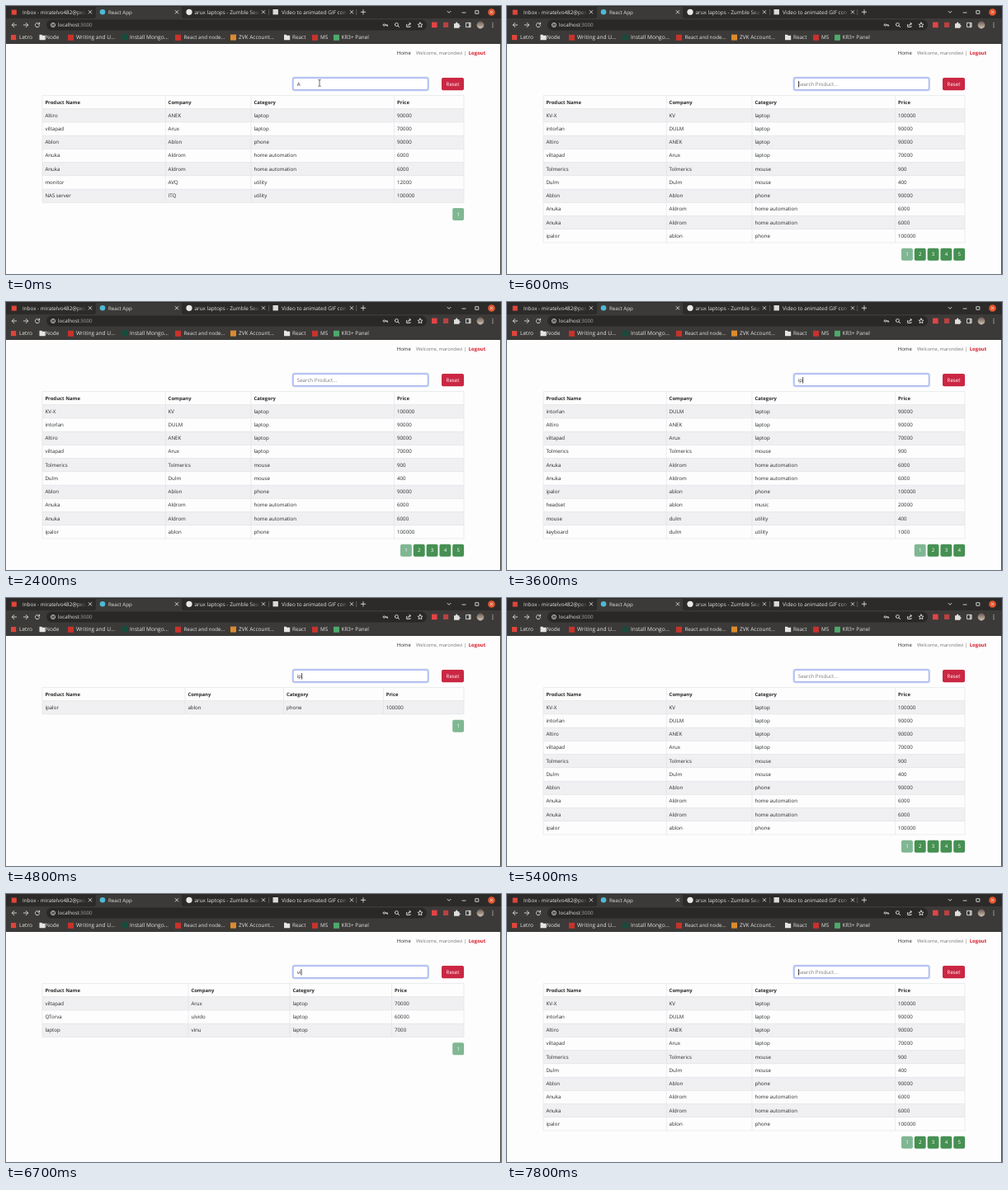
These frames come from a looping animation (600x325 px, 8000 ms). An HTML page:

```html
<!DOCTYPE html>
<html lang="en">
<head>
<meta charset="utf-8">
<title>Product search</title>
<style>
html, body { margin: 0; width: 100%; height: 100%; overflow: hidden; background: #fdfdfd; }
svg { display: block; width: 600px; height: 325px; }
text { font: 6.15px "Open Sans", "Noto Sans", sans-serif; fill: #26292c; text-rendering: geometricPrecision; white-space: pre; }
.b { font-weight: 700; font-size: 5.95px; }
.bar text { fill: #e4e3e1; }
.icon { fill: none; stroke: #dddcda; stroke-width: .9; stroke-linecap: round; stroke-linejoin: round; }
.mid { text-anchor: middle; fill: #fff; }
</style>
</head>
<body>
<svg viewBox="0 0 600 325">
  <defs>
    <linearGradient id="fade"><stop offset="0" stop-color="#2c2b2a" stop-opacity="0"/><stop offset="1" stop-color="#2c2b2a"/></linearGradient>
    <linearGradient id="face" x2="0" y2="1"><stop offset="0" stop-color="#6c5a50"/><stop offset="1" stop-color="#cfc3b4"/></linearGradient>
  </defs>
  <rect width="600" height="325" fill="#fdfdfd"/>
  <g id="bar" class="bar"></g>
  <g id="nav"></g>
  <g id="list"></g>
  <g id="search">
    <rect x="346.6" y="85.8" width="166.3" height="17.4" rx="3.2" fill="#c3cdf8"/>
    <rect x="348.2" y="87.4" width="163.1" height="14.2" rx="1.9" fill="#fff" stroke="#8da0e6" stroke-width=".7"/>
    <text id="hint" x="352.8" y="96.6" style="fill:#74787c">Search Product...</text>
    <text id="query" x="352.8" y="96.6"></text>
    <rect id="caret" y="91" width=".8" height="7.6" fill="#222"/>
    <rect x="528" y="87" width="27" height="15.2" rx="2" fill="#cb2744"/>
    <text class="mid" x="541.5" y="96.6">Reset</text>
    <path id="beam" d="M378.3 89.2q1.7 0 1.7 1q0-1 1.7-1M380 90v6.6M378.3 97.4q1.7 0 1.7-1q0 1 1.7 1" fill="none" stroke="#333" stroke-width=".7"/>
  </g>
  <rect x="599" y="46" width="1" height="279" fill="#4a4948"/>
</svg>
<script>
const $ = id => document.getElementById(id);
const rect = (x, y, w, h, fill, rx = 0) => `<rect x="${x}" y="${y}" width="${w}" height="${h}" fill="${fill}" rx="${rx}"/>`;
const disc = (x, y, r, fill) => `<circle cx="${x}" cy="${y}" r="${r}" fill="${fill}"/>`;
const text = (x, y, s, style = '', cls = '') => `<text x="${x}" y="${y}" class="${cls}" style="${style}">${s}</text>`;
const icon = (x, y, d) => `<path class="icon" transform="translate(${x} ${y})" d="${d}"/>`;
const ring = r => `M${-r} 0a${r} ${r} 0 1 0 ${2 * r} 0a${r} ${r} 0 1 0 ${-2 * r} 0`;
const cross = 'M-1.8-1.8L1.8 1.8M1.8-1.8L-1.8 1.8';

function browserBar() {
  const tabs = [
    [20, 'Inbox - miratelvo482@pos', 6.3, 102],
    [124, 'React App', 6.1, 207],
    [228.5, 'arux laptops - Zumble Sear', 6.4, 312],
    [334, 'Video to animated GIF con', 6.4, 419]
  ];
  const marks = [
    [16, 'Letro', 6.6], [48, 'Node', 6.5], [85, 'Writing and U…', 6.6], [150, 'Install Mongo…', 6.6],
    [215.5, 'React and node…', 6.2], [282, 'ZVK Account…', 6.5], [347, 'React', 6.4], [381, 'MS', 6.4], [406.5, 'KR3+ Panel', 6.4]
  ];
  const folder = x => `<path d="M${x} 34.8h2.6l1 1h3.6v5.4h-7.2z" fill="#e6e5e3"/>`;
  const square = (x, y, fill, w = 7) => rect(x, y, w, w, fill);
  let s = rect(0, 0, 600, 46, '#2c2b2a') + rect(0, 15, 600, 31, '#3b3a39')
    + '<path d="M107 15q2 0 2-2V3q0-2 2-2h100q2 0 2 2v10q0 2 2 2z" fill="#3b3a39"/>';
  for (const [x, label, size, close] of tabs) {
    s += text(x, 9.6, label, `font-size:${size}px`);
    if (label !== 'React App') s += rect(close - 16, 1, 12, 13, 'url(#fade)') + rect(close - 4.5, 1, 20, 13, '#2c2b2a', 0);
    if (label === 'React App') continue;
  }
  // The active tab overlaps the cover of its neighbour.
  s += '<path d="M107 15q2 0 2-2V3q0-2 2-2h100q2 0 2 2v10q0 2 2 2z" fill="#3b3a39"/>' + text(124, 9.6, 'React App');
  for (const t of tabs) s += icon(t[3], 7.3, cross);
  s += rect(318.5, 4, .6, 7, '#777') + rect(424.5, 4, .6, 7, '#777');
  s += square(6.8, 4.6, '#e0453a', 6) + disc(117, 7.3, 3.3, '#4fb8d4') + disc(222, 7.3, 3.6, '#e8e8e8') + square(323.5, 4, '#dcdad7', 6.4);
  s += icon(433, 7.3, 'M-2.7 0h5.4M0-2.7v5.4') + icon(537, 7.3, 'M-2-1L0 1L2-1')
    + icon(555, 8, 'M-2 0h4') + icon(571, 7.5, 'M-1.8-1.8h3.6v3.6h-3.6z')
    + disc(588.5, 7.5, 4.3, '#e4572e') + icon(588.5, 7.5, 'M-1.3-1.3L1.3 1.3M1.3-1.3L-1.3 1.3');

  s += rect(49, 16.6, 461, 12.8, '#292827', 6.4)
    + icon(10, 23, 'M2.7 0h-5.4M-.2-2.6L-2.7 0L-.2 2.6') + icon(24, 23, 'M-2.7 0h5.4M.2-2.6L2.7 0L.2 2.6')
    + icon(38, 23, 'M2.3-1.2A2.6 2.6 0 1 0 2.6.6M2.6-2.8v1.8H.8')
    + icon(57, 23, ring(2.5) + 'M0 0v1.2M0-1.3v.1') 
    + `<text x="63" y="25.2">localhost<tspan style="fill:#aaa8a5">:3000</tspan></text>`
    + icon(460, 23, 'M-2.8 0a1.2 1.2 0 1 0 2.4 0a1.2 1.2 0 1 0-2.4 0M-.4 0h3v1.2M1.4 0v1')
    + icon(474, 23, 'M-2.6-.5a2 2 0 1 0 4 0a2 2 0 1 0-4 0M1 1L2.7 2.7')
    + icon(488, 23, 'M-2.4-.6v3h4.4v-1M-1 1q0-2.6 3.4-2.6M1-2.8L2.6-1.4L1 0')
    + icon(502, 23, 'M0-3L.9-1 3-.8 1.4.6 1.9 2.7 0 1.6-1.9 2.7-1.4.6-3-.8-.9-1z')
    + square(516, 19.6, '#e04444', 6.6) + square(530, 19.8, '#b8423e', 6.2)
    + `<path d="M543 21.2h2q0-1.8 1.2-1.8t1.2 1.8h2v2q1.3 0 1.3 1t-1.3 1v1.6h-6.4z" fill="#e0dfdd"/>`
    + icon(560.5, 23, 'M-2.6-2.6h5.2v5.2h-5.2zM.8-2.4v4.8M1.7-2.4v4.8')
    + disc(575, 23, 4.4, 'url(#face)');
  for (const y of [20.6, 23, 25.4]) s += disc(590, y, .65, '#e0dfdd');

  s += square(6, 35, '#e0453a', 6.2) + folder(40.5) + square(75, 34.8, '#c8322c') + square(140, 34.4, '#174b3c')
    + square(205, 34.8, '#c8322c') + square(272, 34.6, '#dd8b2c') + folder(337) + square(371, 34.8, '#c8322c') + square(397, 34.8, '#4fa86c');
  for (const [x, label, size] of marks) s += text(x, 40.2, label, `font-size:${size}px`);
  return s;
}

const heads = ['Product Name', 'Company', 'Category', 'Price'];
const stock = `KV-X,KV,laptop,100000
intorlan,DULM,laptop,90000
Altiro,ANEK,laptop,90000
viltapad,Arux,laptop,70000
Tolmerics,Tolmerics,mouse,900
Dulm,Dulm,mouse,400
Ablon,Ablon,phone,90000
Anuka,Aldrom,home automation,6000
Anuka,Aldrom,home automation,6000
ipalor,ablon,phone,100000
headset,ablon,music,20000
mouse,dulm,utility,400
keyboard,dulm,utility,1000
monitor,AVQ,utility,12000
TQR,DULM,laptop,100000
hard disk,ZD,utility,6000
NAS server,ITQ,utility,100000
QTorva,ulvido,laptop,60000
laptop,vinu,laptop,7000`.split('\n').map(line => line.split(','));
const pages = { '': 5, i: 4 };
const wide = [44, 193.2, 297, 470.7], narrow = [44, 217, 336.5, 457.3];
const columns = { '': wide, A: wide, i: wide, vi: [44, 221, 344, 467.7] };

function listView(filter) {
  const rows = stock.filter(r => r.some(c => c.includes(filter))).slice(0, 10);
  const cols = columns[filter] || narrow;
  const top = 108.6, first = 124.7, step = 16.22, end = first + rows.length * step;
  const line = '#dfe1e5';
  let s = '';
  rows.forEach((r, i) => {
    const y = first + i * step;
    if (i % 2 === 0) s += rect(44, y, 511, step, '#f0eff1');
    r.forEach((c, k) => s += text(cols[k] + 3.4, y + 10.1, c));
    s += rect(44, y - .3, 511, .6, line);
  });
  heads.forEach((h, k) => s += text(cols[k] + 3.4, 118.8, h, '', 'b'));
  for (const x of [...cols, 555]) s += rect(x - .3, top, .6, end - top, line);
  s += rect(44, top - .3, 511, .6, line) + rect(44, end - .3, 511, .6, line);
  const count = pages[filter] || 1;
  for (let p = 1; p <= count; p++) {
    const x = 541.2 - (count - p) * 15.8;
    s += rect(x, end + 6.8, 13.9, 15, p === 1 ? '#80b793' : '#469052', 2) + text(x + 7, end + 16.5, p, '', 'mid');
  }
  return s;
}

$('bar').innerHTML = browserBar();
$('nav').innerHTML = text(473.8, 59.2, 'Home', 'font-size:6px') + text(497, 59.2, 'Welcome, marondevi |', 'font-size:5.75px;fill:#74777a')
  + text(581.3, 59.2, 'Logout', 'fill:#d3202c;text-anchor:end', 'b');

// time, typed text, applied filter, caret
const steps = [
  [0, 'A', 'A', 0], [100, '', 'A', 0], [200, '', '', 0], [600, '', '', 1], [1200, '', '', 0],
  [1400, 'D', '', 1], [1500, 'D', 'D', 1], [2100, '', 'D', 0], [2200, '', '', 0], [2800, '', '', 1],
  [3400, 'i', '', 1], [3500, 'i', 'i', 1], [3600, 'ip', 'i', 1], [3700, 'ip', 'ip', 1], [4200, 'ip', 'ip', 0], [4800, 'ip', 'ip', 1],
  [5000, '', 'ip', 1], [5100, '', '', 1], [5400, '', '', 0], [6000, '', '', 1],
  [6500, 'v', '', 1], [6600, 'vi', 'v', 1], [6700, 'vi', 'vi', 1], [7200, '', '', 0], [7800, '', '', 1]
];
const loop = 8000;
let shown = null;

function draw(now) {
  const t = now % loop;
  const step = steps.findLast(s => s[0] <= t);
  if (step !== shown) {
    const [at, typed, filter, caret] = step;
    if (!shown || shown[2] !== filter) $('list').innerHTML = listView(filter);
    $('query').textContent = typed;
    $('hint').style.display = typed ? 'none' : '';
    $('caret').setAttribute('x', 353 + (typed ? $('query').getComputedTextLength() : 0));
    $('caret').style.display = caret ? '' : 'none';
    $('beam').style.display = at < 600 ? '' : 'none';
    shown = step;
  }
}

const start = performance.now();
function tick() {
  draw(performance.now() - start);
  requestAnimationFrame(tick);
}
tick();
</script>
</body>
</html>
```
